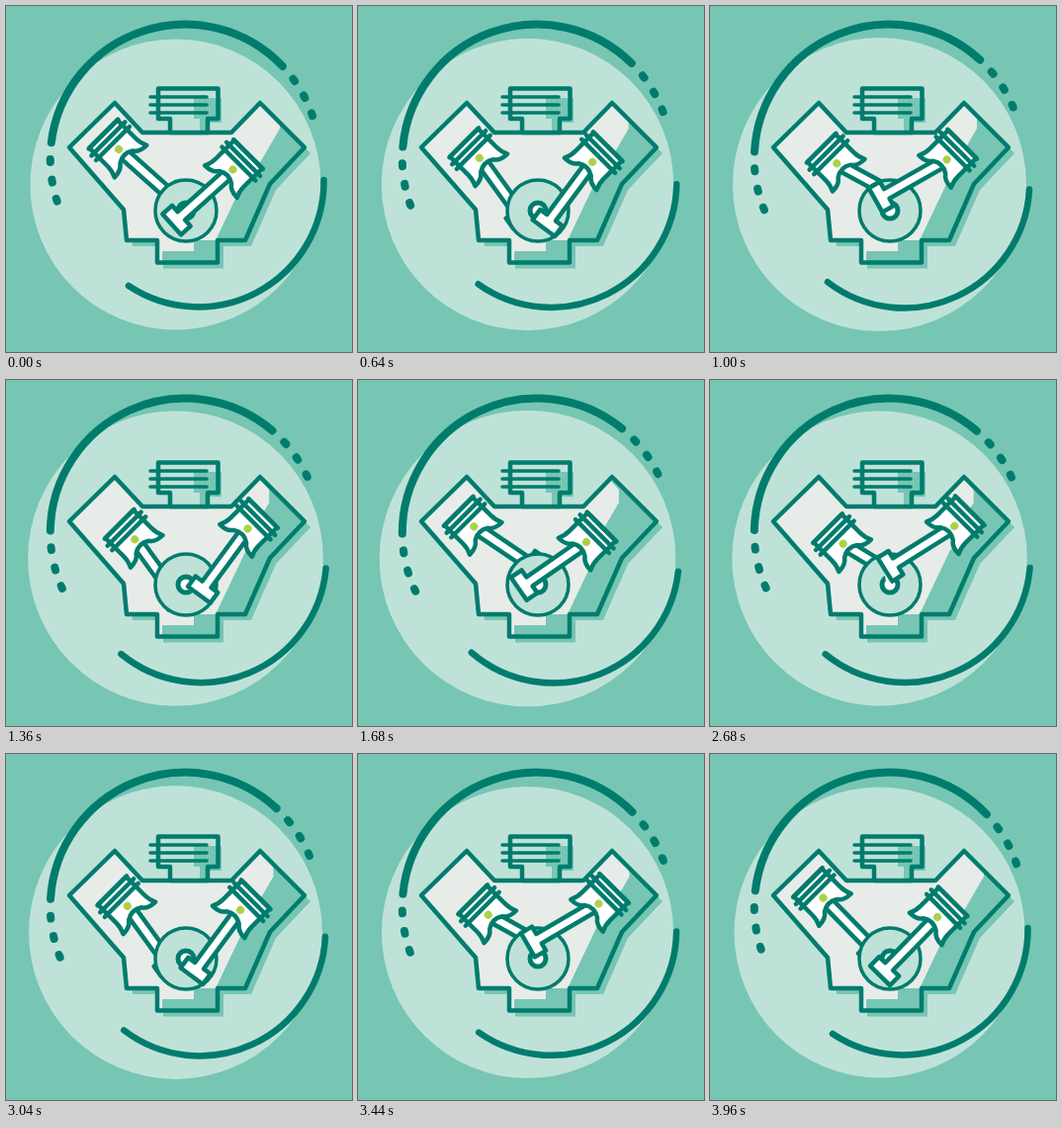
Animation of 350 by 350 pixels, one loop 4 s. Source, as an HTML page:

```html
<!DOCTYPE html>
<html lang="en">
<head>
<meta charset="utf-8">
<title>Engine</title>
<style>
  html, body { margin: 0; width: 100%; height: 100%; overflow: hidden; background: #76c6b3; }
  svg { display: block; width: 100%; height: 100%; }
  .line { fill: none; stroke: #007c6d; stroke-linecap: round; stroke-linejoin: round; }
  .part { fill: #fff; stroke: #007c6d; stroke-width: 4.5; stroke-linejoin: round; }
  .shade { fill: #76c6b3; }
  .pale { fill: #bfe2d8; }
</style>
</head>
<body>
<svg viewBox="0 0 350 350">
  <defs>
    <path id="block" d="M110 98 L138 128 H228 L257 98 L302 143 L267 180 L242 237 H214 V259.5 H153 V237 H122 L119 206 L64 143 Z"/>
    <path id="intake" d="M154 83.5 H214.5 V114 H204 V128 H166 V114 H154 Z"/>
    <clipPath id="inBlock"><use href="#block"/></clipPath>
    <g id="piston">
      <path class="part" d="M-20 -22 H20 V4 Q20 11 23 17 Q13 17 9 11 Q0 5 -9 11 Q-13 17 -23 17 Q-20 11 -20 4 Z"/>
      <path class="line" stroke-width="4.5" d="M-21 -22 H21 M-24 -15 H24 M-24 -8.5 H24"/>
      <circle r="4" fill="#a9d24a"/>
    </g>
  </defs>

  <circle id="disc" class="pale" cx="171.5" cy="180.5"/>
  <g id="upperRing" class="line" stroke-width="8"></g>
  <path id="lowerRing" class="line" stroke-width="6.5" d="M321.5 176 A127 127 0 0 1 124 283"/>

  <use href="#block" class="shade" x="6" y="6"/>
  <use href="#block" fill="#e7ece9"/>
  <g clip-path="url(#inBlock)" class="shade">
    <path id="bankShade" d="M258 90 L277 111 V124 L256 160 L285 190 L330 140 Z"/>
    <path d="M275 150 L243 172 L212 237 H190 V248 H158 V265 H250 L300 150 Z"/>
  </g>
  <use href="#block" class="line" stroke-width="4.5"/>

  <use href="#intake" class="pale"/>
  <path class="shade" d="M190 93 H218 V118 H204 V128 H196 V114 H190 Z"/>
  <use href="#intake" class="line" stroke-width="4.5"/>
  <path class="line" stroke-width="3.5" d="M146 92 H203 M146 100 H203 M146 108 H203"/>

  <g id="left"></g>
  <circle class="pale" cx="182" cy="207" r="31" stroke="#007c6d" stroke-width="3.5"/>
  <circle class="part" cx="182" cy="207" r="8" style="stroke-width: 5"/>
  <path id="web" fill="none" stroke="#fff" stroke-width="7"/>
  <g id="right"></g>
</svg>
<script>
const LOOP = 4000, TURN = 800;
const CRANK = { x: 182, y: 207, radius: 17 };
const BORE_DROP = 6; // the cylinder axes meet this far below the crank centre
const RING = { x: 181, y: 154.8, r: 136.2 };
const byId = id => document.getElementById(id);
const rad = deg => deg * Math.PI / 180;
const polar = (deg, r, cx = 0, cy = 0) => [cx + r * Math.cos(rad(deg)), cy + r * Math.sin(rad(deg))];

function arc(from, to) {
  const { x, y, r } = RING;
  return `<path d="M${polar(from, r, x, y)} A${r} ${r} 0 0 1 ${polar(to, r, x, y)}"/>`;
}
byId('upperRing').innerHTML = arc(187, 316.5)
  + [-35.9, -27.6, -19.3, 179.3, 170.6, 162.3].map(a => arc(a - .6, a + .6)).join('');

function makeCylinder(id, tilt, length) {
  const group = byId(id);
  group.innerHTML = `<g><path class="part" d="M-5.5 0 V${length - 10} H-14 V${length + 3} H14 V${length - 10} H5.5 V0 Z"/></g>
    <use href="#piston"/>`;
  const [rod, piston] = group.children;
  const [ax, ay] = polar(tilt - 90, 1);
  return pinAngle => {
    const [px, pinY] = polar(pinAngle, CRANK.radius);
    const py = pinY - BORE_DROP;
    const cross = px * ay - py * ax;
    const reach = px * ax + py * ay + Math.sqrt(length ** 2 - cross ** 2);
    const x = ax * reach, y = ay * reach;
    const swing = Math.atan2(x - px, py - y) * 180 / Math.PI;
    const place = `translate(${CRANK.x + x} ${CRANK.y + BORE_DROP + y})`;
    rod.setAttribute('transform', `${place} rotate(${swing})`);
    piston.setAttribute('transform', `${place} rotate(${tilt})`);
  };
}
const moveLeft = makeCylinder('left', -45, 75);
const moveRight = makeCylinder('right', 45, 80);

function draw(now) {
  const t = now % LOOP;
  const sway = (1 - Math.cos(2 * Math.PI * t / LOOP)) / 2;
  byId('disc').setAttribute('r', 147 + 3 * sway);
  byId('upperRing').setAttribute('transform', `rotate(${-7.8 * sway} ${RING.x} ${RING.y})`);
  byId('lowerRing').setAttribute('transform', `rotate(${7.5 * sway} 178.6 204.7)`);
  byId('bankShade').setAttribute('transform', `translate(${-14 * sway} 0)`);

  const pin = 135 + 360 * t / TURN;
  moveRight(pin);
  moveLeft(pin + 90);
  byId('web').setAttribute('d', `M${CRANK.x} ${CRANK.y} L${polar(pin, CRANK.radius, CRANK.x, CRANK.y)}`);
}

const start = performance.now();
function frame() {
  draw(performance.now() - start);
  requestAnimationFrame(frame);
}
frame();
</script>
</body>
</html>
```
